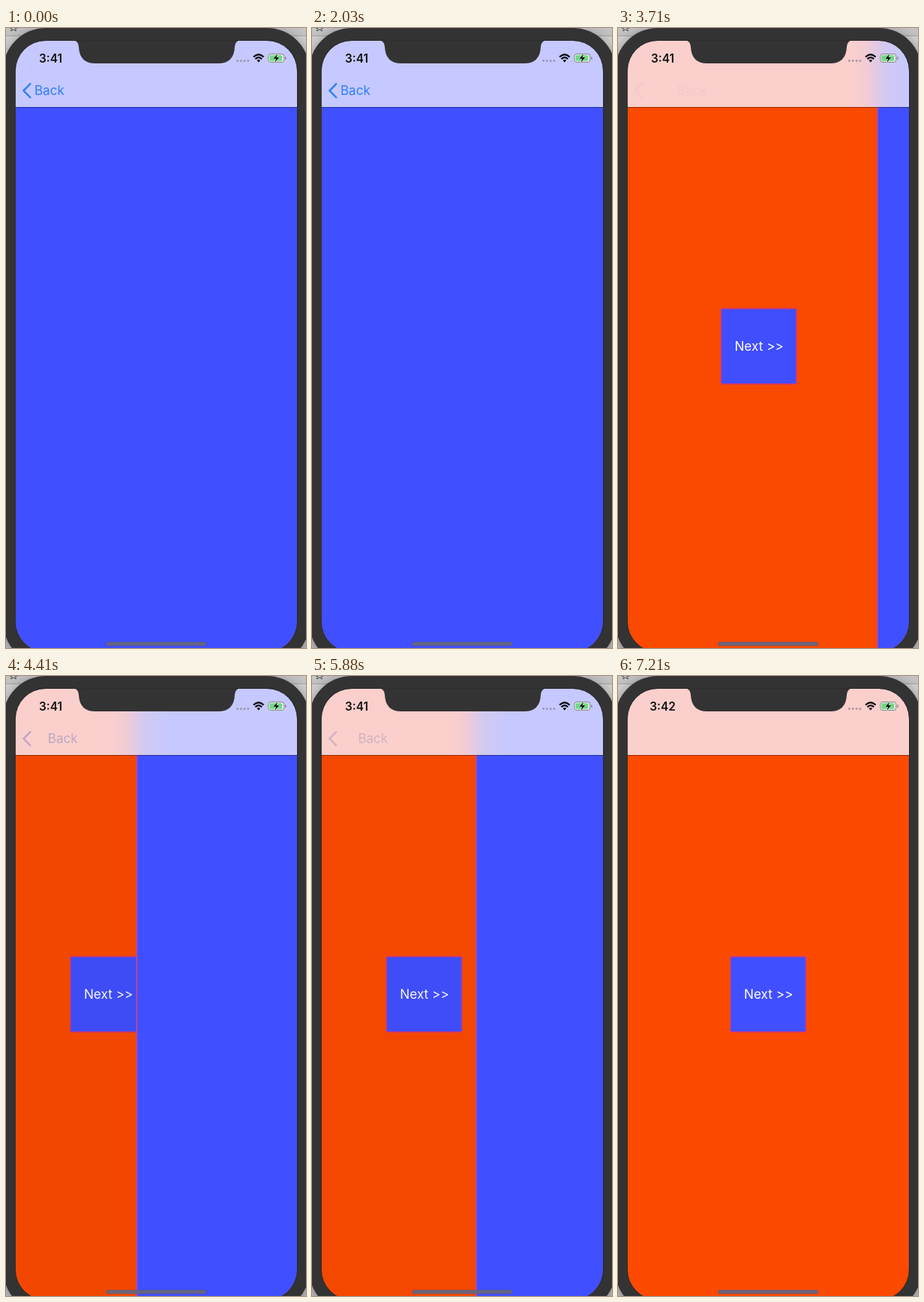
These frames come from a looping animation (400 px wide and 824 px high, 7280 ms). An HTML page:

```html
<!DOCTYPE html>
<html lang="en">
<head>
<meta charset="utf-8">
<style>
  html, body { margin: 0; height: 100%; overflow: hidden; }
  svg { display: block; width: 400px; height: 824px; font-family: Inter, "Liberation Sans", sans-serif; }
  #bezel { filter: drop-shadow(0 5px 9px rgba(0, 0, 0, .45)); }
</style>
</head>
<body>
<svg viewBox="0 0 400 824">
  <defs>
    <clipPath id="screen"><rect x="12.700" y="17" width="375.300" height="812" rx="40"/></clipPath>
    <linearGradient id="blur" gradientUnits="userSpaceOnUse" y1="0" y2="0">
      <stop offset="0" stop-color="#fbcfcc"/>
      <stop offset=".25" stop-color="#f3ccd3"/>
      <stop offset=".6" stop-color="#d2c9f1"/>
      <stop offset="1" stop-color="#c6c9ff"/>
    </linearGradient>
  </defs>

  <!-- window behind the device -->
  <rect width="400" height="824" fill="#d2d2d2"/>
  <rect width="400" height="10" fill="#c4c4c4"/>
  <path d="M0 10.500H400" stroke="#a5a5a5"/>
  <path d="M5 0L8 1L6.500 4L10 2L13.500 4L12 1L15 0" fill="none" stroke="#555"/>
  <rect id="bezel" x="-4" y="0" width="409" height="846" rx="57" fill="#333"/>

  <g clip-path="url(#screen)">
    <rect x="12" y="105" width="376" height="724" fill="#fc4a00"/>
    <g id="button">
      <rect x="150" y="373" width="100.500" height="100" rx="1.500" fill="#404fff" stroke="#c83a88" stroke-width="1.500"/>
      <text x="168" y="429.300" font-size="17.200" fill="#fff">Next &gt;&gt;</text>
    </g>
    <rect id="dim" x="12" y="105" width="376" height="724"/>
    <g id="detail">
      <rect x="12.700" y="105" width="376" height="724" fill="#404fff"/>
      <path id="fringe" d="M13 105V829" stroke="#b446a8" stroke-width="2"/>
    </g>
    <rect x="12" y="17" width="376" height="88" fill="url(#blur)"/>
    <path d="M12 105.500H388" stroke="#000" stroke-opacity=".4"/>
    <g id="back">
      <path d="M33 73.500L23.500 83.300L33 93" fill="none" stroke="currentColor" stroke-width="2.500"/>
      <text id="label" x="38" y="89.300" font-size="17" fill="currentColor">Back</text>
    </g>
  </g>
  <rect x="12.300" y="16.500" width="376.200" height="813" rx="40.500" fill="none" stroke="#222" stroke-opacity=".65"/>
  <path d="M89 16.500Q96.500 16.500 97 25Q98 47 119 47H283Q304 47 305 25Q305.500 16.500 313 16.500Z" fill="#333"/>

  <!-- status bar -->
  <text id="clock" x="59.500" y="45.600" text-anchor="middle" font-size="15.300" font-weight="600" fill="#111"></text>
  <path d="M308.500 43.500h15" stroke="#8d8794" stroke-opacity=".75" stroke-width="3" stroke-linecap="round" stroke-dasharray="0 4.800"/>
  <g fill="none" stroke="#111" stroke-width="2.200">
    <path d="M330 38.500Q336.800 32 343.600 38.500M332.400 41.200Q336.800 37.200 341.200 41.200"/>
    <path d="M334.500 43L336.800 45.800L339.100 43Q336.800 41.200 334.500 43Z" fill="#111" stroke="none"/>
  </g>
  <rect x="349.800" y="34.500" width="21" height="11" rx="3" fill="#dce8e2" stroke="#858b90"/>
  <rect x="351.500" y="36.200" width="16.500" height="7.600" rx="1.500" fill="#70d883"/>
  <path d="M372.800 38.300v3.400" stroke="#858b90" stroke-width="1.500"/>
  <path d="M361.800 34.500L356.500 41H360L358.600 45.700L364.200 39H360.700Z" fill="#111" stroke="#dff3e4" stroke-width=".8" paint-order="stroke"/>

  <rect x="133.500" y="816" width="133.500" height="5" rx="2.500" fill="#686780" fill-opacity=".94" stroke="#44435c" stroke-opacity=".4" stroke-width=".6"/>
</svg>
<script>
const LOOP = 7280, STEP = 70, WIDTH = 375, CLOCK_TICK = 6500;
// time in ms, distance the blue page is dragged to the right
const drag = [
  [0, 0], [70, 0], [560, 190], [1050, 342], [1260, 326], [1640, 130], [1980, 0],
  [2660, 0], [3150, 3], [3260, 3], [3710, 333], [3920, 348], [4130, 328], [4480, 120], [4760, 7], [4900, 0],
  [5460, 0], [5880, 206], [6230, 325], [6480, 345], [6860, 375], [LOOP, 375]
];
const $ = id => document.getElementById(id);
const blur = $('blur');

const slope = i => (drag[i + 1][1] - drag[i][1]) / (drag[i + 1][0] - drag[i][0]);

// monotone tangent: harmonic mean of the neighbouring slopes
function tangent(i) {
  if (i === 0 || i === drag.length - 1) return 0;
  const a = slope(i - 1), b = slope(i);
  return a * b > 0 ? 2 * a * b / (a + b) : 0;
}

function offsetAt(t) {
  const i = drag.findIndex((key, n) => n < drag.length - 1 && t < drag[n + 1][0]);
  const [t0, x0] = drag[i], [t1, x1] = drag[i + 1];
  const d = t1 - t0, u = (t - t0) / d, v = 1 - u;
  return x0 * v * v * (1 + 2 * u) + x1 * u * u * (3 - 2 * u)
    + d * u * v * (tangent(i) * v - tangent(i + 1) * u);
}

const mix = (a, b, k) => a + (b - a) * k;

function draw(t) {
  const x = offsetAt(t), p = x / WIDTH, edge = 13 + x;
  $('detail').setAttribute('transform', `translate(${x})`);
  $('fringe').style.opacity = x > 1 && p < 1 ? 1 : 0;
  $('button').setAttribute('transform', `translate(${-0.3 * (WIDTH - x)})`);
  $('dim').style.opacity = 0.07 * (1 - p);

  // the bar's blur leaves no tint once either page fills the screen
  const spread = Math.min(1, x / 14, (WIDTH - x) / 14);
  const center = edge + 4 * spread;
  blur.setAttribute('x1', center - 38 * spread - 0.01);
  blur.setAttribute('x2', center + 38 * spread);
  $('blur').setAttribute('gradientTransform', `translate(${p < 1 ? -1 : 1})`);

  const grey = Math.min(1, p * 2);
  $('back').style.color = `rgb(${mix(46, 135, grey)},${mix(126, 130, grey)},${mix(250, 175, grey)})`;
  $('back').style.opacity = p >= 1 ? 0 : Math.pow(1 - p, 1.25);
  $('label').setAttribute('x', 38 + 0.1 * x + 0.025 * x * p);
  $('clock').textContent = t < CLOCK_TICK ? '3:41' : '3:42';
}

function frame() {
  draw(Math.floor(performance.now() % LOOP / STEP) * STEP);
  requestAnimationFrame(frame);
}
frame();
</script>
</body>
</html>
```
